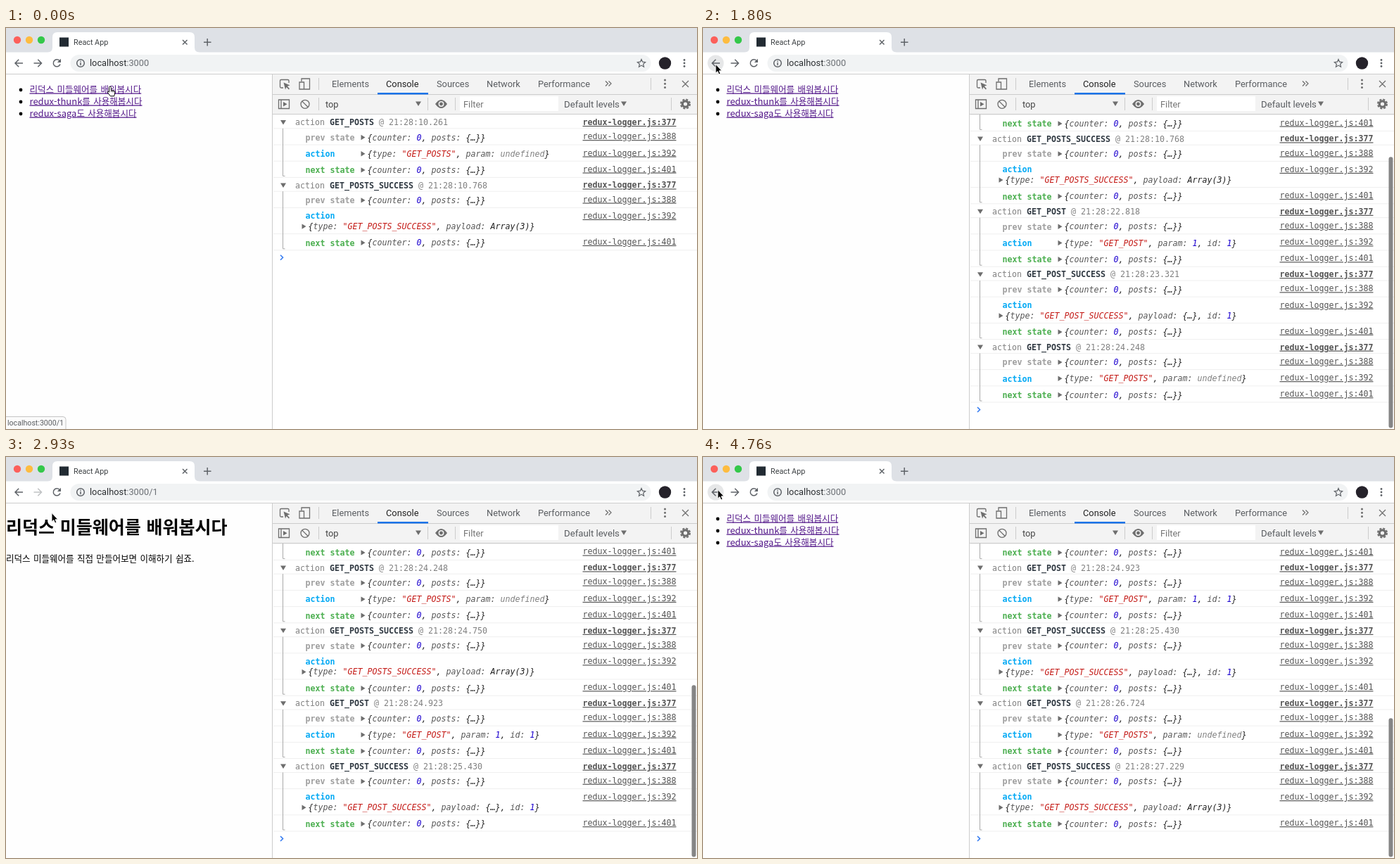
Recreate the animation shown at these times as an HTML page. Size 982x570 px, loop 4800 ms.

```html
<!DOCTYPE html>
<html lang="ko">
<head>
<meta charset="utf-8">
<title>React App</title>
<style>
html, body { margin: 0; width: 100%; height: 100%; overflow: hidden; background: #fefefe; }
svg { display: block; width: 100%; height: 100%; }
text { font-family: Roboto, "Liberation Sans", sans-serif; font-size: 12.8px; fill: #5a5d61; }
.page text { font-family: "Noto Sans CJK KR", "Noto Sans CJK", "Noto Sans CJK JP", sans-serif; font-size: 12.55px; word-spacing: .8px; fill: #000; }
.page .h1 { font-size: 25px; font-weight: bold; word-spacing: .7px; }
.page .a { fill: #551a8b; text-decoration: underline; }
.page .en { font-size: 13px; }
.log text { font-family: "DejaVu Sans Mono", monospace; font-size: 11.63px; fill: #808080; }
.log .obj { font-style: italic; fill: #222; }
.log .link { fill: #545454; text-decoration: underline; }
.log .b { font-weight: bold; }
.log .title { font-weight: bold; fill: #303942; }
.key { fill: #565656; }
.num { fill: #1c00cf; }
.str { fill: #c41a16; }
.dim { fill: #808080; }
.line { fill: none; stroke: #5f6368; stroke-width: 1.5; }
.thin { fill: none; stroke: #6e6e6e; stroke-width: 1.3; }
.solid { fill: #6e6e6e; }
.rule { fill: none; stroke: #ccc; }
</style>
</head>
<body>
<svg viewBox="0 0 982 570">
  <defs><clipPath id="view"><path d="M379 123H982V570H379Z"/></clipPath></defs>
  <path fill="#fefefe" d="M0 0H982V570H0Z"/>

  <!-- page -->
  <g class="page" id="list">
    <circle cx="21" cy="88" r="2.4"/><circle cx="21" cy="105" r="2.4"/><circle cx="21" cy="122" r="2.4"/>
    <text class="a" x="33.5" y="91.5">리덕스 미들웨어를 배워봅시다</text>
    <text class="a" x="33.5" y="108.5"><tspan class="en">redux-thunk</tspan>를 사용해봅시다</text>
    <text class="a" x="33.5" y="125.5"><tspan class="en">redux-saga</tspan>도 사용해봅시다</text>
  </g>
  <g class="page" id="loading"><text x="0" y="78">로딩중...</text></g>
  <g class="page" id="post">
    <text class="h1" x="0" y="109">리덕스 미들웨어를 배워봅시다</text>
    <text x="0" y="148.5">리덕스 미들웨어를 직접 만들어보면 이해하기 쉽죠.</text>
  </g>
  <g id="status">
    <path d="M-1 552.5H81Q85 552.5 85 556.5V571H-1Z" fill="#fbfbfb" stroke="#c4c4c4"/>
    <text x="2" y="565" style="font-size:10.6px">localhost:3000/1</text>
  </g>

  <!-- console -->
  <path fill="#fff" d="M379 123H982V570H379Z"/>
  <g clip-path="url(#view)"><g class="log" id="log"></g></g>
  <rect id="bar" x="974.5" width="6" rx="3" fill="#858585"/>

  <!-- developer tools -->
  <path fill="#f3f3f3" d="M379 66H982V122H379Z"/>
  <path class="rule" d="M378.5 66V570M379 94.5H982M379 122.5H982M444.5 71V88M916.5 71V88M444.5 99V117M599.5 99V117M638.5 99V117M945.5 99V117"/>
  <path fill="#1a73e8" d="M528 92H600V94.5H528Z"/>
  <path fill="#fff" d="M645 97H785V118H645Z"/>
  <g>
    <text x="463" y="83.5">Elements</text><text x="540" y="83.5" style="fill:#222">Console</text>
    <text x="612" y="83.5">Sources</text><text x="683" y="83.5">Network</text><text x="756" y="83.5">Performance</text>
    <text x="454" y="112.5" style="fill:#444">top</text>
    <text x="650" y="112.5" style="fill:#757575">Filter</text>
    <text x="793" y="112.5" style="font-size:13.2px">Default levels</text>
  </g>
  <path class="thin" d="M394 85H391Q389.5 85 389.5 83.5V75Q389.5 73.5 391 73.5H400.5Q402 73.5 402 75V78M420 76V72H431.5V87H424M417 77H423.5V87H417Z"/>
  <path class="solid" d="M394.5 77.5L403.5 81.5L399.8 82.8L403 86.2L401.8 87.4L398.5 84L397 87.5Z"/>
  <path class="thin" d="M852 75.5L855.5 79L852 82.5M856.5 75.5L860 79L856.5 82.5M961 75L970 84M970 75L961 84"/>
  <g class="solid"><circle cx="936.5" cy="74" r="1.5"/><circle cx="936.5" cy="79.3" r="1.5"/><circle cx="936.5" cy="84.6" r="1.5"/></g>
  <path class="thin" d="M387.5 102H402.5V114.5H387.5ZM391 102V114.5"/>
  <path class="solid" d="M394 105L399.5 108.2L394 111.5ZM582 104.5H590L586 111ZM874 104.5H882L878 111Z"/>
  <circle class="thin" cx="425" cy="108.3" r="6"/><path class="thin" d="M420.8 104.1L429.2 112.5"/>
  <path class="solid" d="M610 108Q618.5 96 627 108Q618.5 120 610 108Z"/>
  <circle cx="618.5" cy="108" r="3.2" fill="#6e6e6e" stroke="#f3f3f3" stroke-width="1.5"/>
  <circle cx="965.5" cy="108" r="4.2" fill="none" stroke="#6e6e6e" stroke-width="3.2"/>
  <circle cx="965.5" cy="108" r="6.5" fill="none" stroke="#6e6e6e" stroke-width="2" stroke-dasharray="3 2.105"/>

  <!-- browser -->
  <path fill="#dee1e6" d="M0 0H982V35H0Z"/>
  <path fill="#fff" d="M0 34.5H59Q66 34.5 66 27.5V13Q66 6 73 6H261Q268 6 268 13V27.5Q268 34.5 275 34.5H982V65H0Z"/>
  <path class="rule" d="M0 65.5H982"/>
  <circle cx="16" cy="17" r="5.2" fill="#fc605b"/><circle cx="33" cy="17" r="5.2" fill="#fdbc40"/><circle cx="50" cy="17" r="5.2" fill="#34c84a"/>
  <rect x="76" y="13.5" width="13" height="13" fill="#222b33"/>
  <text x="96" y="24" style="font-size:10.8px;fill:#3c4043">React App</text>
  <path class="line" d="M251 17L257.5 23.5M257.5 17L251 23.5M281 20.2H291.5M286.2 15V25.5"/>
  <circle id="hover" cx="18" cy="50" r="11.5" fill="#e6e7e8"/>
  <path class="line" d="M24 50H13M18.2 44.8L13 50L18.2 55.2"/>
  <path class="line" id="forward" d="M39.5 50H50.5M45.3 44.8L50.5 50L45.3 55.2"/>
  <path class="line" d="M76 46.5A5 5 0 1 0 77 51.5"/><path fill="#5f6368" d="M78 43.8V49H72.8Z"/>
  <rect x="91.5" y="38" width="825" height="24" rx="12" fill="#f1f3f4"/>
  <circle class="line" cx="106" cy="50" r="5.3"/><path class="line" d="M106 49V53M106 46.7V48"/>
  <text x="119" y="54" style="fill:#2b2e31">localhost<tspan fill="#6b6f74">:3000<tspan id="path"></tspan></tspan></text>
  <path class="line" style="stroke-width:1.2" d="M903 44.5L904.6 48.2L908.6 48.6L905.6 51.2L906.5 55.2L903 53.1L899.5 55.2L900.4 51.2L897.4 48.6L901.4 48.2Z"/>
  <circle cx="936.5" cy="50" r="8.7" fill="#25222a"/>
  <g fill="#5f6368"><circle cx="964" cy="45.5" r="1.4"/><circle cx="964" cy="50" r="1.4"/><circle cx="964" cy="54.5" r="1.4"/></g>

  <!-- pointer shapes -->
  <g id="pointer">
    <path id="arrow" d="M0 -.5V12.2L2.8 9.6L4.7 14L6.8 13.1L5 8.8H8.8Z" stroke="#fff" stroke-width=".9"/>
    <g id="hand" stroke="#000" stroke-linejoin="round">
      <path fill="#fff" d="M-1 .5A1.4 1.4 0 0 1 1.8 .5V4.5L6 5.3Q7.6 5.8 7.4 7.6L6.2 12.8H.8L-3 7.8Q-3.6 6.2 -2 6.2L-1 7.2Z"/>
      <path fill="none" stroke-width=".7" d="M1.8 5V7M3.8 5.2V7.2M5.6 5.6V7.4"/>
    </g>
    <path id="beam" fill="none" stroke="#222" stroke-width="1.2" d="M-3 -6.5Q0 -6.5 0 -4.5Q0 -6.5 3 -6.5M0 -5V5M-3 6.5Q0 6.5 0 4.5Q0 6.5 3 6.5M-1.5 2H1.5"/>
  </g>
</svg>
<script>
const $ = id => document.getElementById(id);
const LOOP = 4800, TOP = 123, HEAD = 19.8, ROW = 23.2, WRAP = 37.2;

// [action type, time stamp, moment it is logged]
const groups = [
  ['GET_POSTS', '10.261', 0], ['GET_POSTS_SUCCESS', '10.768', 0],
  ['GET_POST', '22.818', 360], ['GET_POST_SUCCESS', '23.321', 830],
  ['GET_POSTS', '24.248', 1770], ['GET_POSTS_SUCCESS', '24.750', 2270],
  ['GET_POST', '24.923', 2460], ['GET_POST_SUCCESS', '25.430', 2930],
  ['GET_POSTS', '26.724', 4260], ['GET_POSTS_SUCCESS', '27.229', 4760]
];

const span = (cls, s) => `<tspan class="${cls}">${s}</tspan>`;
const text = (x, y, s, cls = '', style = '') => `<text x="${x}" y="${y}" class="${cls}" style="${style}">${s}</text>`;
const link = (y, line, cls = '') => text(819.5, y, 'redux-logger.js:' + line, 'link ' + cls);
const rule = y => `<path d="M380 ${y}H982" stroke="#efefef"/>`;
const object = (x, y, s) => `<path class="solid" d="M${x - 9} ${y - 7.7}l6 3.7l-6 3.7Z"/>` + text(x, y, s, 'obj');
const state = `{${span('key', 'counter:')} ${span('num', 0)}, ${span('key', 'posts:')} {…}}`;

function payload(type) {
  const one = !type.includes('POSTS'), done = type.includes('SUCCESS');
  const id = `, ${span('key', 'id:')} ${span('num', 1)}`;
  const rest = done
    ? `${span('key', 'payload:')} ${one ? '{…}' + id : 'Array(3)'}`
    : `${span('key', 'param:')} ${one ? span('num', 1) + id : span('dim', 'undefined')}`;
  return `{${span('key', 'type:')} ${span('str', `"${type}"`)}, ${rest}}`;
}

function drawGroup(type, stamp, y) {
  const wrap = type.includes('SUCCESS');
  const prev = y + HEAD, act = prev + ROW, next = act + (wrap ? WRAP : ROW), end = next + ROW;
  const label = (y, s, color) => text(425.5, y, s, 'b', 'fill:' + color);
  return [prev, act, next, end].map(rule).join('') +
    `<path class="solid" d="M390 ${y + 8}h8l-4 6.5Z"/>` +
    `<path d="M396.5 ${end - 2}H393.5V${prev}" fill="none" stroke="#a9a9a9"/>` +
    text(411, y + 15.2, `action ${span('title', type)} @ 21:28:${stamp}`) + link(y + 15, 377, 'b') +
    label(prev + 17, 'prev state', '#9e9e9e') + object(513.5, prev + 16.7, state) + link(prev + 15.3, 388) +
    label(act + (wrap ? 15.8 : 17), 'action', '#03a9f4') +
    object(wrap ? 429.5 : 513.5, act + (wrap ? 30.7 : 16.7), payload(type)) + link(act + 15.5, 392) +
    label(next + 17, 'next state', '#4caf50') + object(513.5, next + 16.7, state) + link(next + 15.3, 401);
}

let shown = 0;
function drawLog(count) {
  if (count === shown) return;
  shown = count;
  let y = TOP, html = '';
  for (const [type, stamp] of groups.slice(0, count)) {
    html += drawGroup(type, stamp, y);
    y += HEAD + 3 * ROW + (type.includes('SUCCESS') ? WRAP - ROW : 0);
  }
  html += `<path d="M390 ${y + 7}l3.5 3.5l-3.5 3.5" fill="none" stroke="#367cf1" stroke-width="1.6"/>`;
  const scroll = Math.max(0, y - TOP - 409), ratio = 442 / (447 + scroll);
  $('log').innerHTML = html;
  $('log').setAttribute('transform', `translate(0 ${-scroll})`);
  $('bar').setAttribute('y', 126.5 + scroll * ratio);
  $('bar').setAttribute('height', 447 * ratio);
}

// Interpolates [time, values...] keys
function at(t, keys, ease = u => u) {
  const i = keys.findIndex(k => k[0] > t);
  if (i === 0) return keys[0].slice(1);
  if (i < 0) return keys[keys.length - 1].slice(1);
  const a = keys[i - 1], b = keys[i], u = ease((t - a[0]) / (b[0] - a[0]));
  return a.slice(1).map((v, j) => v + (b[j + 1] - v) * u);
}
const smooth = u => u * u * (3 - 2 * u);
const within = (t, a, b) => t >= a && t < b;
const show = (id, on) => $(id).style.opacity = +on;

const route = [[1030, 147.5, 84], [1530, 20, 49], [1590, 18, 52], [1930, 18, 52],
  [2300, 65, 80], [3360, 65, 80], [3760, 21, 47]];
const statusFade = [[630, 1], [790, 0], [2370, 0], [2460, .5], [2600, 0]];
const barFade = [[1769, 0], [1770, 1], [3360, 1], [3720, 0], [4259, 0], [4260, 1]];

function render(t) {
  const loading = within(t, 330, 830);
  const post = within(t, 830, 1740) || within(t, 2430, 4230);
  show('loading', loading);
  show('post', post);
  show('list', !loading && !post);
  show('status', at(t, statusFade)[0]);
  show('bar', at(t, barFade)[0]);
  show('hover', within(t, 1560, 2060) || t >= 4100);
  show('forward', within(t, 2460, 4260) ? .4 : 1);
  $('path').textContent = within(t, 360, 1770) || within(t, 2460, 4260) ? '/1' : '';
  drawLog(groups.filter(g => g[2] <= t).length);

  const hand = t < 370 || within(t, 2300, 2400), beam = within(t, 370, 1090);
  show('hand', hand);
  show('beam', beam);
  show('arrow', !hand && !beam);
  $('pointer').setAttribute('transform', `translate(${at(t, route, smooth)})`);
}

const start = performance.now();
function tick(now) {
  render(Math.max(0, now - start) % LOOP);
  requestAnimationFrame(tick);
}
render(0);
requestAnimationFrame(tick);
</script>
</body>
</html>
```
